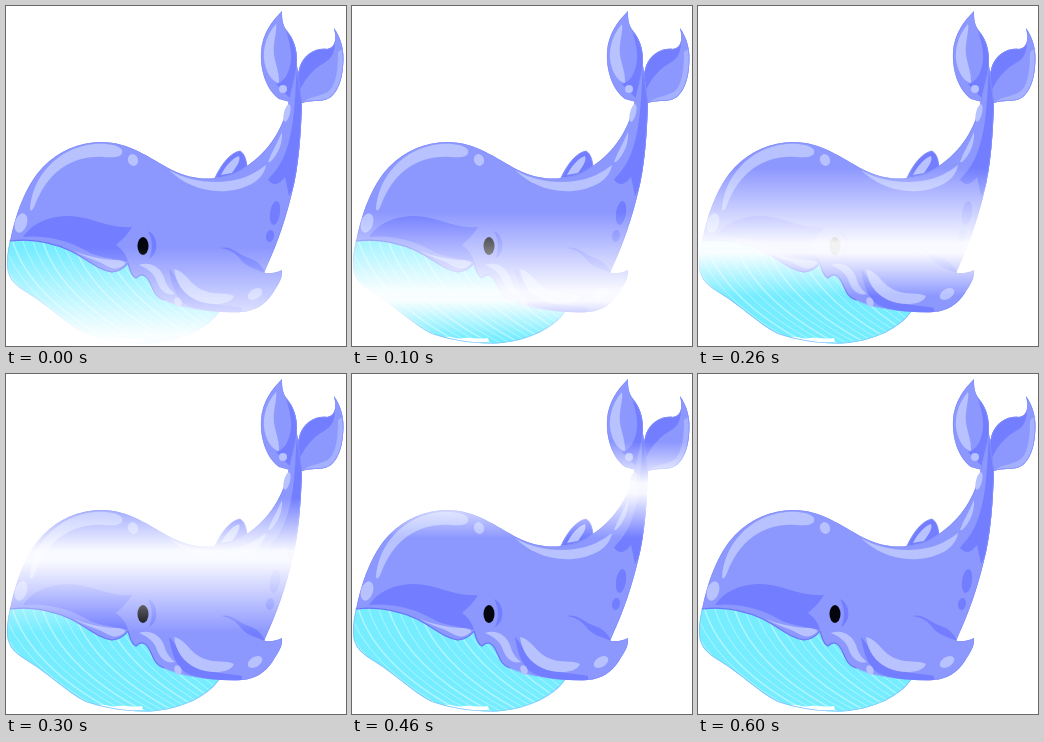
Recreate the animation shown at these times as an HTML page with a canvas. Size 340 px wide and 340 px high, loop 700 ms.

```html
<!DOCTYPE html>
<html lang="en">
<head>
<meta charset="utf-8">
<title>Shining whale</title>
<style>
html, body { margin: 0; width: 100%; height: 100%; overflow: hidden; background: #fff; }
canvas { display: block; width: 340px; height: 340px; }
</style>
</head>
<body>
<canvas id="stage" width="340" height="340"></canvas>
<script>
const ctx = document.getElementById('stage').getContext('2d');
const BASE = '#8d98ff', DARK = '#727eff', DEEP = '#6a76f5', LIGHT = '#b7c2ff', EDGE = '#8490fa';
const STEP = 100, STEPS = 7;

// Shine per step: centre, reach upwards, reach downwards
const SHINE = [[334, 92, 40], [290, 84, 42], [242, 80, 48], [182, 58, 76], [114, 46, 50], [21, 24, 42]];

const MOUTH = 'M4 235C27 232 48 237 65 245C81 253 92 264 106 266C114 265 119 261 122 257' +
  'C124 263 125 270 130 272C133 269 136 268 139 270C147 275 145 290 158 294';
const BODY = 'M4 236C9 210 19 180 37 161C53 145 73 136 95 136C124 136 143 152 166 164' +
  'C181 171 195 174 210 172C222 171 232 167 241 160C263 145 278 122 283 94L291 60L296 97' +
  'C295 128 293 160 286 187C280 212 272 236 261 260L258 267C266 268 272 266 276 264' +
  'C277 273 271 280 267 287C259 299 249 305 236 306C222 307 207 305 193 304L120 290L30 260Z';
const BELLY = MOUTH + 'C171 300 188 304 214 305C201 323 177 334 150 337C127 339 101 335 80 328' +
  'C60 318 43 300 23 288C10 280 2 274 1 260C1 249 2 243 4 235Z';
const LEFT_FLUKE = 'M276 5C266 15 256 28 255 46C254 66 261 84 273 93L284 96' +
  'C287 86 291 72 291 55C291 41 287 32 281 25C276 18 276 12 276 5Z';
const RIGHT_FLUKE = 'M328 22C331 34 329 42 321 43C309 41 298 49 294 60L289 79' +
  'L294 98C301 94 310 96 319 94C330 91 336 76 337 61C339 44 335 32 328 22Z';
const FIN = 'M209 172C214 161 223 147 234 145C239 148 240 154 241 160C231 168 221 171 209 172Z';

function fill(d, color) {
  ctx.fillStyle = color;
  ctx.fill(new Path2D(d));
}

function line(d, color, width) {
  ctx.strokeStyle = color;
  ctx.lineWidth = width;
  ctx.stroke(new Path2D(d));
}

function spot(x, y, rx, ry, turn, color) {
  ctx.fillStyle = color;
  ctx.beginPath();
  ctx.ellipse(x, y, rx, ry, turn, 0, Math.PI * 2);
  ctx.fill();
}

// Fills a shape and paints details that stay inside it
function shape(d, color, details) {
  fill(d, color);
  ctx.save();
  ctx.clip(new Path2D(d));
  details();
  ctx.restore();
}

function tail() {
  shape(LEFT_FLUKE, BASE, () => {
    fill('M276 4C278 24 286 37 285 53C284 67 278 76 270 78C277 86 284 91 287 96L296 58L288 22Z', DARK);
    fill('M270 18C259 30 255 48 260 62C263 71 268 76 273 77C274 64 266 53 268 39C269 29 271 24 270 18Z', LIGHT);
    spot(277, 83, 4, 4, 0, LIGHT);
    line(LEFT_FLUKE, EDGE, 1.5);
  });
  shape(RIGHT_FLUKE, BASE, () => {
    fill('M289 98C294 80 302 66 318 57C328 52 331 42 328 20L319 42L299 47L288 70Z', DARK);
    fill('M296 97C305 89 317 91 324 84C331 76 332 60 332 46L341 40L338 90L310 101Z', '#a5b0ff');
    line(RIGHT_FLUKE, EDGE, 1.5);
  });
}

function body() {
  fill(FIN, DARK);
  fill('M215 169C219 161 225 153 233 150C235 155 230 161 226 167Z', LIGHT);
  line(FIN, EDGE, 1);
  shape(BODY, BASE, () => {
    fill('M291 58C289 90 289 125 278 150C272 164 265 169 262 174C268 181 274 178 279 171' +
      'L283 190L300 160L298 80Z', DARK);
    spot(269, 207, 5, 12, 0.15, DARK);
    spot(264, 230, 4, 6, 0.2, DARK);
    fill('M17 231C25 219 39 211 59 210C84 209 101 223 126 221C120 231 115 234 110 239' +
      'C116 243 121 250 122 256C111 253 96 252 84 247C70 238 45 228 17 231Z', DARK);
    line(BODY, EDGE, 1.5);
  });
  fill('M24 203C26 172 50 142 88 138C101 137 113 139 116 144C118 151 109 152 98 151C67 149 42 165 29 199C27 204 25 206 24 203Z', LIGHT);
  spot(127, 154, 5, 6, -0.4, LIGHT);
  spot(15, 217, 6, 10, 0.3, LIGHT);
  fill('M163 164C180 174 203 178 223 175C239 173 251 166 260 159C258 174 241 183 221 185C197 187 176 177 163 164Z', LIGHT);
  fill('M262 156C266 145 272 136 276 126C277 137 272 149 264 156Z', LIGHT);
  spot(281, 107, 3, 9, 0.25, LIGHT);
}

function belly() {
  shape(BELLY, '#76edff', () => {
    for (let i = -6; i < 15; i++) {
      const x = 5 + i * 10;
      line(`M${x} 230Q${x + 17} 292 ${x + 105} 338`, 'rgba(205,251,255,.65)', i % 3 ? 0.9 : 1.5);
    }
    fill('M92 331C101 330 104 334 112 332C121 331 127 334 136 332L137 336L115 337Z', '#fff');
    line(BELLY, '#86c4ff', 1.5);
  });
  line(MOUTH, DEEP, 1.2);
}

function face() {
  fill('M68 245C80 250 95 253 107 254C116 254 120 256 119 258C114 263 107 264 101 260C91 254 80 252 68 245Z', LIGHT);
  fill('M142 225C152 229 154 247 143 253C147 245 147 234 142 225Z', DARK);
  spot(137, 240, 5.5, 9, 0, '#05050d');
  fill('M133 259C144 255 154 261 158 271C160 279 164 284 169 288C160 290 154 284 151 276C148 267 142 263 133 259Z', LIGHT);
}

function flipper() {
  fill('M163 263C169 268 174 282 186 291C202 300 222 299 236 302L236 306C205 307 180 304 173 292C167 284 165 274 163 263Z', DARK);
  fill('M168 263C181 266 184 280 199 285C209 289 220 286 228 290C224 300 203 300 190 294C177 288 170 277 168 263Z', LIGHT);
  spot(172, 296, 3.5, 5, -0.4, LIGHT);
  spot(249, 288, 8, 5, -0.55, LIGHT);
  fill('M214 242C226 239 232 249 243 252C252 255 257 261 259 267C249 263 241 261 235 254C229 246 223 243 214 242Z', DARK);
}

function shine(step) {
  if (!SHINE[step]) return;
  const [mid, up, down] = SHINE[step];
  const size = up + down, at = up / size;
  const band = ctx.createLinearGradient(0, mid - up, 0, mid + down);
  band.addColorStop(0, 'rgba(255,255,255,0)');
  band.addColorStop(at - 5 / size, 'rgba(255,255,255,.95)');
  band.addColorStop(at + 5 / size, 'rgba(255,255,255,.95)');
  band.addColorStop(1, 'rgba(255,255,255,0)');
  ctx.fillStyle = band;
  ctx.fillRect(0, mid - up, 340, size);
}

function draw() {
  ctx.fillStyle = '#fff';
  ctx.fillRect(0, 0, 340, 340);
  ctx.lineCap = ctx.lineJoin = 'round';
  tail();
  body();
  belly();
  face();
  flipper();
  shine(Math.floor((performance.now() - start) / STEP) % STEPS);
  requestAnimationFrame(draw);
}

const start = performance.now();
draw();
</script>
</body>
</html>
```
